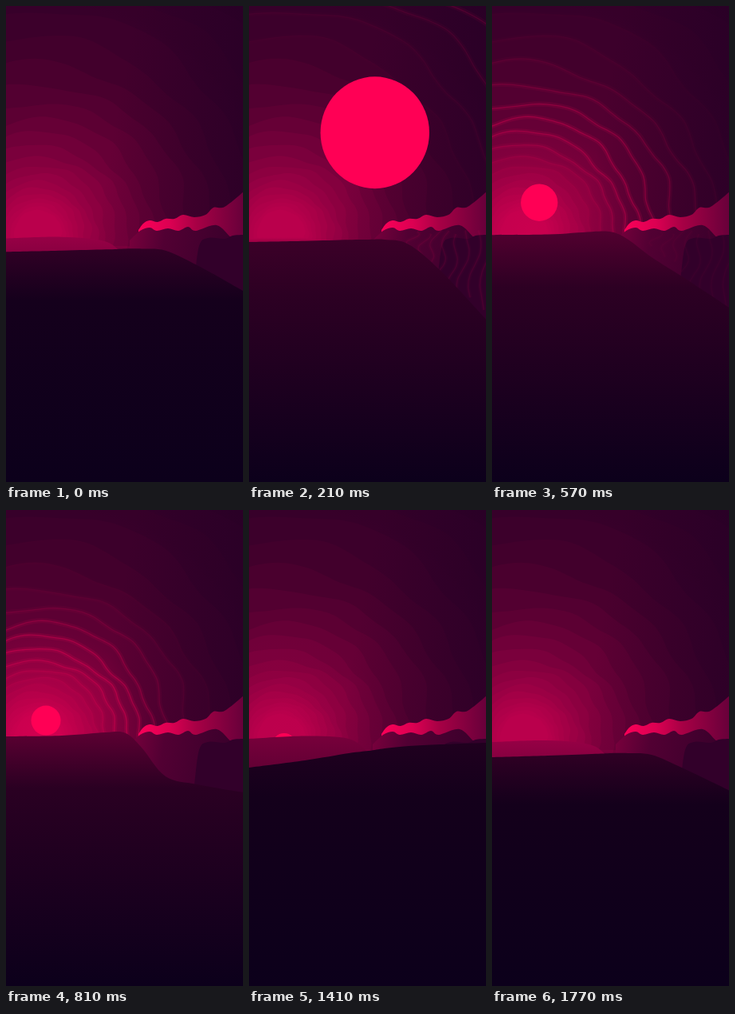
These frames come from a looping animation (297 by 595 pixels, 1800 ms). An HTML page:

```html
<!DOCTYPE html>
<html lang="en">
<head>
<meta charset="utf-8">
<title>Sunset cave</title>
<style>
html, body { margin: 0; width: 100%; height: 100%; overflow: hidden; background: #0d001a; }
svg { display: block; width: 100%; height: 100%; }
</style>
</head>
<body>
<svg id="stage" viewBox="0 0 297 595" preserveAspectRatio="none">
  <defs id="defs">
    <radialGradient id="sky" gradientUnits="userSpaceOnUse" cx="40" cy="290" r="410"></radialGradient>
    <radialGradient id="glow" gradientUnits="userSpaceOnUse" cx="50" cy="280" r="130">
      <stop offset="0" stop-color="#ff0058"/><stop offset="1" stop-color="#ff0058" stop-opacity="0"/>
    </radialGradient>
    <linearGradient id="shade" gradientUnits="userSpaceOnUse" x1="130" x2="297" y1="180" y2="210">
      <stop offset="0" stop-color="#200024" stop-opacity="0"/><stop offset="1" stop-color="#200024" stop-opacity=".5"/>
    </linearGradient>
    <linearGradient id="gap" gradientUnits="userSpaceOnUse" x1="166" x2="297" y1="0" y2="0">
      <stop offset="0" stop-color="#fa0058"/><stop offset=".3" stop-color="#dc0052"/>
      <stop offset=".55" stop-color="#a80045"/><stop offset="1" stop-color="#68003a"/>
    </linearGradient>
    <linearGradient id="rock" gradientUnits="userSpaceOnUse" x1="155" x2="297" y1="285" y2="310">
      <stop offset="0" stop-color="#78003c"/><stop offset=".3" stop-color="#520033"/>
      <stop offset="1" stop-color="#36002a"/>
    </linearGradient>
  </defs>
  <rect width="297" height="595" fill="url(#sky)"/>
  <g id="bands"></g>
  <rect width="297" height="300" fill="url(#shade)"/>
  <rect id="halo" width="200" height="300" fill="url(#glow)"/>
  <g id="ridges" fill="none" stroke="#ff0058"></g>
  <path id="opening" fill="url(#gap)"/>
  <path id="rocks" fill="url(#rock)"/>
  <path id="nearRocks" fill="#32002a"/>
  <g id="cracks" fill="none" stroke="#c0004c"></g>
  <ellipse id="sun" fill="#ff0055"/>
  <g id="hills"></g>
</svg>
<script>
const LOOP = 1800, STEP = 30;
const $ = id => document.getElementById(id);
const clamp = v => Math.max(0, Math.min(1, v));

function set(node, attrs) {
  for (const key in attrs) node.setAttribute(key, attrs[key]);
}
function add(parent, tag, attrs = {}) {
  const node = document.createElementNS('http://www.w3.org/2000/svg', tag);
  set(node, attrs);
  return parent.appendChild(node);
}

// Smooth curve through points, as a path string.
function curve(points) {
  const at = i => points[Math.max(0, Math.min(points.length - 1, i))];
  const handle = (p, from, to) => p.map((v, k) => (v + (to[k] - from[k]) / 6).toFixed(2));
  let d = 'M' + points[0];
  for (let i = 0; i < points.length - 1; i++) {
    const [a, b, c, e] = [at(i - 1), at(i), at(i + 1), at(i + 2)];
    d += `C${handle(b, a, c)} ${handle(c, e, b)} ${c}`;
  }
  return d;
}

// Monotone cubic interpolation.
function ease(t, times, values) {
  const last = times.length - 1;
  if (t <= times[0]) return values[0];
  if (t >= times[last]) return values[last];
  let i = 0;
  while (t > times[i + 1]) i++;
  const slope = k => (values[k + 1] - values[k]) / (times[k + 1] - times[k]);
  const tangent = k => {
    if (k === 0) return slope(0);
    if (k === last) return slope(last - 1);
    const a = slope(k - 1), b = slope(k);
    return a * b > 0 ? 2 * a * b / (a + b) : 0;
  };
  const h = times[i + 1] - times[i], u = (t - times[i]) / h, v = 1 - u;
  return values[i] * (1 + 2 * u) * v * v + values[i + 1] * (3 - 2 * u) * u * u
    + h * u * v * (tangent(i) * v - tangent(i + 1) * u);
}

// Cave rings around the vanishing point.
function caveColor(r) {
  const red = 44 + 164 * Math.exp(-((r / 150) ** 1.3));
  return `rgb(${Math.round(red)},0,${Math.round(28 + .26 * red)})`;
}
for (let i = 0; i <= 10; i++) {
  add($('sky'), 'stop', { offset: i / 10, 'stop-color': caveColor(i * 41) });
}
function ringPath(r, seed) {
  const points = [];
  for (let i = 0; i <= 40; i++) {
    const a = Math.PI * (1.05 - i / 40 * 1.1);
    const lump = 1 + .018 * Math.sin(4 * a + seed * 1.3) + .012 * Math.sin(9 * a + seed * 2.1)
      + .014 * Math.max(0, Math.cos(a)) * Math.sin(17 * a + seed);
    points.push([40 + r * lump * Math.cos(a), 285 - r * lump * Math.sin(a)]);
  }
  return curve(points);
}
const rings = [];
for (let i = 20; i >= 0; i--) {
  const radius = 30 * 1.14 ** i, d = ringPath(radius, i);
  add($('bands'), 'path', { d, fill: caveColor(radius * .95), 'fill-opacity': .55 });
  const ridge = add($('ridges'), 'g');
  add(ridge, 'path', { d, 'stroke-width': 6, opacity: .3 });
  add(ridge, 'path', { d, 'stroke-width': 1.3 });
  rings.push({ radius, ridge });
}

// Opening between the upper and lower rocks.
const ceiling = [[166, 280], [172, 272], [180, 268], [190, 270], [200, 266], [211, 266], [222, 261], [236, 264], [250, 261], [260, 252], [274, 251], [298, 232]];
const floor = [[155, 293], [168, 281], [180, 277], [189, 281], [203, 278], [216, 281], [228, 276], [238, 281], [264, 274], [283, 290], [298, 294]];
const nearFloor = [[236, 345], [242, 300], [253, 290], [274, 291], [284, 287], [298, 286]];
set($('opening'), { d: curve(ceiling) + 'V300H166Z' });
set($('rocks'), { d: curve(floor) + 'V410H155Z' });
set($('nearRocks'), { d: curve(nearFloor) + 'V410H236Z' });
for (let i = 0; i < 8; i++) {
  const points = [];
  for (let k = 0; k <= 6; k++) {
    points.push([
      211 + i * 13 + 5 * Math.sin(k * 1.1 + i) - 2 * k,
      282 + 3 * Math.sin(i * 2) + k / 6 * (18 + i * 11)
    ]);
  }
  const d = curve(points);
  add($('cracks'), 'path', { d, 'stroke-width': 1.2, opacity: .45 });
  add($('cracks'), 'path', { d, 'stroke-width': 5, opacity: .15 });
}

// Hill heights at hillX for each age, with the red of crest and body.
const hillX = [0, 70, 125, 150, 170, 200, 240, 298];
const hillTimes = [850, 1170, 1410, 1770, 1950, 2130, 2610, 2970, 3210, 3570, 3750];
const hillShapes = [
  [410, 420, 405, 395, 385, 372, 362, 354],
  [340, 338, 329, 324, 320, 313, 303, 294],
  [322, 313, 304, 301, 298, 295, 293, 291],
  [309, 307, 305, 304, 304, 306, 323, 351],
  [297, 295.5, 294.2, 294, 294.5, 300, 329, 385],
  [292, 291, 289.3, 289, 289, 295, 334, 402],
  [283, 282, 278, 279, 297, 333, 343, 353],
  [283, 281, 281, 288, 312, 332, 345, 360],
  [286, 282.5, 286, 303, 316, 340, 350, 360],
  [290, 288, 294, 314, 330, 345, 355, 360],
  [295, 293, 296, 315, 330, 345, 355, 360]
];
const crestReds = [36, 33, 32, 48, 56, 69, 92, 98, 120, 150, 156];
const bodyReds = [30, 24, 20, 20, 42, 47, 42, 70, 84, 104, 108];
function hillColor(age, reds) {
  const red = ease(age, hillTimes, reds);
  return `rgb(${Math.round(red)},0,${Math.round(21 + .32 * red)})`;
}

const hills = [2, 1, 0].map(n => {
  const gradient = add($('defs'), 'linearGradient',
    { id: 'hill' + n, gradientUnits: 'userSpaceOnUse', x1: 0, x2: 0, y2: 595 });
  const stops = [0, .22, 1].map(offset => add(gradient, 'stop', { offset, 'stop-color': '#0c001b' }));
  return { n, gradient, stops, path: add($('hills'), 'path', { fill: `url(#hill${n})` }) };
});

function drawHill({ n, gradient, stops, path }, t) {
  const age = t + n * LOOP, born = hillTimes[0];
  const visible = age > born && age < hillTimes[hillTimes.length - 1];
  set(path, { display: visible ? 'inline' : 'none' });
  if (!visible) return;
  const points = hillX.map((x, i) => [x, ease(age, hillTimes, hillShapes.map(s => s[i]))]);
  set(path, { d: curve(points) + 'V596H0Z', opacity: clamp((age - born) / 200) });
  set(gradient, { y1: Math.min(...points.map(p => p[1])) });
  set(stops[0], { 'stop-color': hillColor(age, crestReds) });
  set(stops[1], { 'stop-color': hillColor(age, bodyReds) });
}

// Sun: depth is 1 / radius; side and lift are offsets in radii.
const sunTimes = [60, 150, 330, 810, 1170, 1410, 1770];
const sunDepth = [.0005, .00826, .027, .054, .0606, .0667, .072];
const sunSide = [2.25, 2.22, 2.16, 2.27, 2.24, 2.4, 2.4];
const sunLift = [1.4, 1.76, 2.176, 1.51, .4545, -.2, -1.1];

function draw(t) {
  const r = 1 / ease(t, sunTimes, sunDepth);
  set($('sun'), {
    cx: 8 + r * ease(t, sunTimes, sunSide),
    cy: 291 - r * ease(t, sunTimes, sunLift),
    rx: r,
    ry: r * (1 + .12 * clamp((r - 37) / 150))
  });
  const fade = clamp((1380 - t) / 330);
  for (const { radius, ridge } of rings) {
    const light = Math.exp(-((Math.log(radius / (6.4 * r)) / .37) ** 2));
    set(ridge, { opacity: (fade * light * (.2 + .55 * Math.exp(-radius / 130))).toFixed(3) });
  }
  set($('halo'), { opacity: ease(t, [200, 330, 810, 1170, 1450], [0, .05, .35, .28, 0]) });
  set($('cracks'), { opacity: ease(t, [170, 300, 360, 600], [0, .85, .85, 0]) });
  hills.forEach(hill => drawHill(hill, t));
}

const start = performance.now();
function tick() {
  const t = (performance.now() - start) % LOOP;
  draw(Math.floor(t / STEP) * STEP);
  requestAnimationFrame(tick);
}
tick();
</script>
</body>
</html>
```
